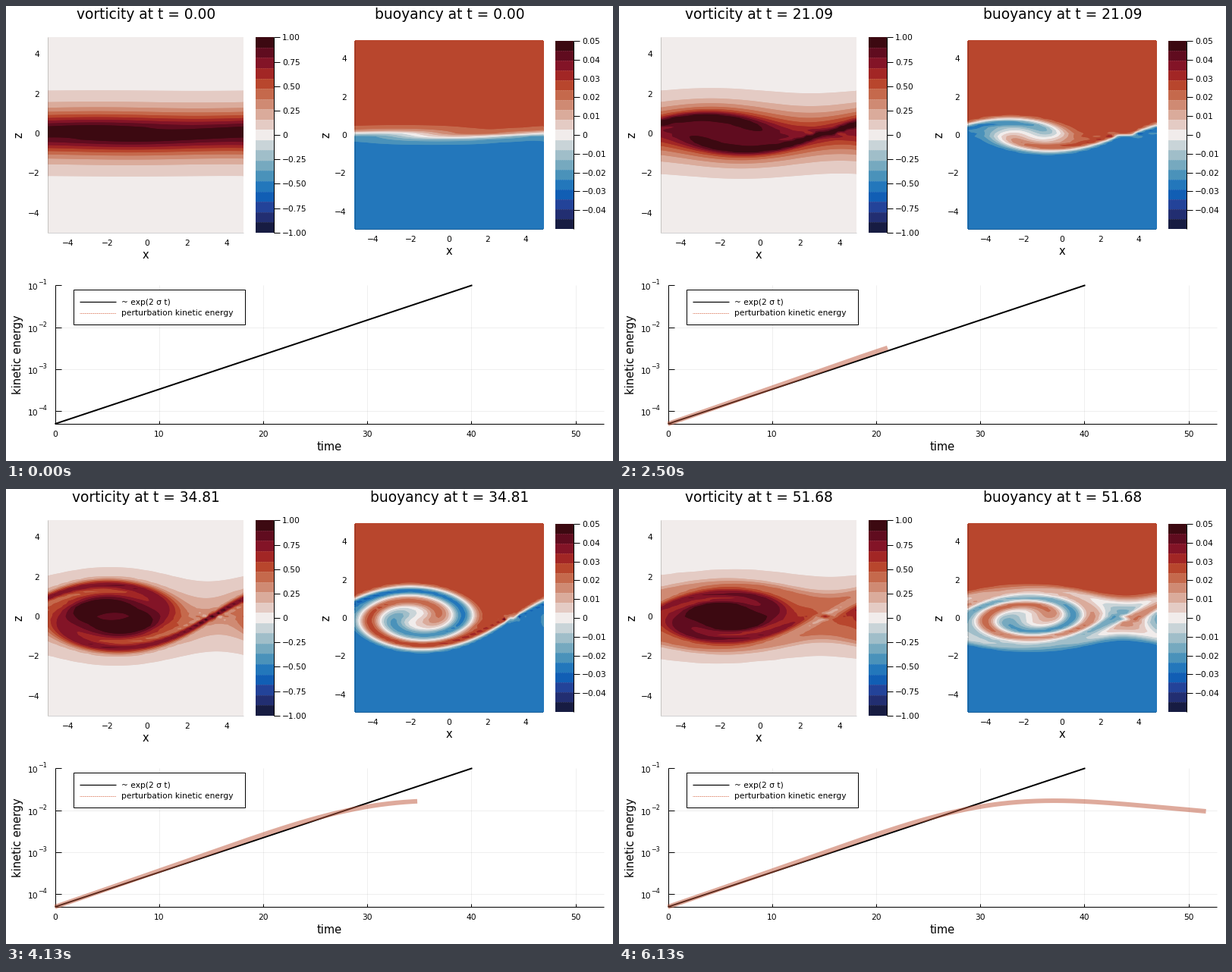
A matplotlib script that plays this animation: 800 px wide and 600 px high, repeating every 6260 ms.

```python
import numpy as np
import matplotlib.pyplot as plt
from matplotlib.animation import FuncAnimation
from matplotlib.colors import LinearSegmentedColormap
from matplotlib.patches import Rectangle

# Kelvin-Helmholtz billow: finite volumes on a staggered grid, axis 0 is z.
N, L = 64, 10.0
D = L / N
FRAMES, LOOP_MS, SUBSTEPS = 50, 6260, 11
TICKS = 2 * FRAMES + 1  # two ticks per picture, the last one is held
FRAME_TIME = 1.05472
GROWTH = 0.1 / FRAME_TIME
DT = FRAME_TIME / SUBSTEPS
RI, H, NU = 0.1, 0.25, 2e-4
START_ENERGY = 5e-5

faces = -L / 2 + D * np.arange(N + 1)
cells = faces[:-1] + D / 2
BILLOW_X = faces[21]
SHEAR = np.tanh(cells)[:, None] * np.ones(N)
STRAT = RI * H * np.tanh(cells / H)[:, None] * np.ones(N)

WRAP = np.arange(-3, N + 2) % N
CELL = np.clip(np.arange(-3, N + 3), 0, N - 1)
FACE = np.clip(np.arange(-2, N + 3), 0, N)

modes = np.arange(N)
DCT = np.sqrt(2 / N) * np.cos(np.pi * np.outer(modes, modes + 0.5) / N)
DCT[0] /= np.sqrt(2)
EIGEN = -4 / D**2 * (np.sin(np.pi * modes / (2 * N))[:, None] ** 2
                     + np.sin(np.pi * np.arange(N // 2 + 1) / N) ** 2)
EIGEN[0, 0] = np.inf


def stencil(q, idx):
    p, n = q[idx], len(idx) - 5
    return [p[j:j + n] for j in range(6)]


def centred(q, idx):
    _, a, b, c, d, _ = stencil(q, idx)
    return (7 * (b + c) - (a + d)) / 12


def flux(q, v, idx):
    """Fifth-order upwind flux of q carried by v."""
    a, b, c, d, e, f = stencil(q, idx)
    even = 37 * (c + d) - 8 * (b + e) + (a + f)
    odd = 10 * (d - c) - 5 * (e - b) + (f - a)
    return (v * even - np.abs(v) * odd) / 60


def centred_x(q):
    return centred(q.T, WRAP).T


def div_x(q, v):
    f = flux(q.T, v.T, WRAP).T
    return (np.roll(f, -1, 1) - f) / D


def div_z(q, v, idx):
    return np.diff(flux(q, v, idx), axis=0) / D


def laplacian(q):
    p = np.vstack((q[:1], q, q[-1:]))
    return (np.roll(q, 1, 1) + np.roll(q, -1, 1) + p[2:] + p[:-2] - 4 * q) / D**2


def tendency(u, w, b, gravity):
    gu = (NU * laplacian(u - SHEAR) - div_x(u, centred_x(u))
          - div_z(u, centred_x(w), CELL))
    gw = NU * laplacian(w) - div_x(w, centred(u, CELL))
    gw[1:-1] += gravity * (b[1:] + b[:-1]) / 2 - div_z(w, centred(w, FACE), FACE)
    gw[[0, -1]] = 0
    gb = NU * laplacian(b - STRAT) - div_x(b, u) - div_z(b, w, CELL)
    return gu, gw, gb


def project(u, w, b):
    div = (np.roll(u, -1, 1) - u + np.diff(w, axis=0)) / D
    p = np.fft.irfft(DCT.T @ (DCT @ np.fft.rfft(div, axis=1) / EIGEN), N, axis=1)
    u = u - (p - np.roll(p, 1, 1)) / D
    w[1:-1] -= np.diff(p, axis=0) / D
    return u, w, b


def step(state, gravity):
    previous = None
    for gamma, zeta in ((8 / 15, 0), (5 / 12, -17 / 60), (3 / 4, -5 / 12)):
        rate = tendency(*state, gravity)
        previous = previous or rate
        state = project(*(q + DT * (gamma * g + zeta * h)
                          for q, g, h in zip(state, rate, previous)))
        previous = rate
    return state


def energy(u, w, b):
    return 0.5 * (np.mean((u - SHEAR) ** 2) + np.mean(w**2))


def rescale(state, target):
    u, w, b = state
    s = np.sqrt(target / energy(*state))
    return SHEAR + s * (u - SHEAR), s * w, STRAT + s * (b - STRAT)


def unstable_mode():
    """Growing mode of the linearised flow, symmetric about BILLOW_X."""
    k, z = 2 * np.pi / L, faces[1:-1]
    m = N - 1
    eye, flow = np.eye(m), np.tanh(z)
    lap = (np.eye(m, k=1) + np.eye(m, k=-1) - 2 * eye) / D**2 - k**2 * eye
    inv = np.linalg.inv(lap)
    curvature = -2 * flow * (1 - flow**2)
    n2 = RI / np.cosh(z / H) ** 2
    matrix = 1j * k * np.block([
        [curvature[:, None] * inv - np.diag(flow), -eye],
        [n2[:, None] * inv, -np.diag(flow)]])
    values, vectors = np.linalg.eig(matrix)
    mode = vectors[:, np.argmax(values.real)]
    psi = inv @ mode[:m]
    scale = -psi[m // 2]
    psi, buoy = np.pad(psi / scale, 1), np.pad(mode[m:] / scale, 1)
    psi = (psi + psi[::-1].conj()) / 2
    buoy = (buoy - buoy[::-1].conj()) / 2
    psi = np.outer(psi, np.exp(1j * k * (faces - BILLOW_X))).real
    buoy = np.outer((buoy[1:] + buoy[:-1]) / 2,
                    np.exp(1j * k * (cells - BILLOW_X))).real
    return (SHEAR + np.diff(psi[:, :-1], axis=0) / D,
            -np.diff(psi, axis=1) / D, STRAT + buoy)


def grow(state, steps, gravity):
    """Let a tiny perturbation settle, then measure its growth rate."""
    state = rescale(state, 1e-8)
    for _ in range(steps):
        state = step(state, gravity)
    before = energy(*state)
    for _ in range(steps):
        state = step(state, gravity)
    return state, np.log(energy(*state) / before) / (2 * DT * steps)


def vorticity(u, w, b):
    shear = np.vstack((np.zeros((1, N)), np.diff(u, axis=0) / D))
    return shear - (w - np.roll(w, 1, 1))[:-1] / D


def simulate():
    # Find the gravity at which the mode grows at the plotted rate.
    state, rate = grow(unstable_mode(), 100, 1)
    state, light_rate = grow(state, 75, 0.95)
    gravity = 1 - 0.05 * (GROWTH - rate) / (light_rate - rate)
    gravity = np.clip(gravity, 0.9, 1.05)
    state, _ = grow(state, 50, gravity)

    state = rescale(state, START_ENERGY)
    snapshots, energies = [], [energy(*state)]
    for frame in range(FRAMES):
        snapshots.append((vorticity(*state), state[2]))
        if frame < FRAMES - 1:
            for _ in range(SUBSTEPS):
                state = step(state, gravity)
                energies.append(energy(*state))
    return snapshots, np.array(energies)


snapshots, energies = simulate()
times = DT * np.arange(len(energies))

# Drawing: one axes in pixel units, y downwards.
PT = 0.72
BANDS = 19
stops = [(23, 28, 66), (41, 58, 143), (11, 102, 189), (69, 144, 185),
         (142, 181, 194), (210, 216, 219), (230, 210, 204), (213, 157, 137),
         (196, 101, 72), (172, 43, 36), (120, 14, 40), (60, 9, 17)]
stops = [(i / 11, c) for i, c in enumerate(stops)]
stops += [(0.5, (241, 237, 236)), (14 / 18, (185, 72, 46))]
balance = LinearSegmentedColormap.from_list(
    "balance", [(p, np.array(c) / 255) for p, c in sorted(stops)])
palette = balance(np.linspace(0, 1, BANDS))

plt.rcParams["font.family"] = "DejaVu Sans"
fig = plt.figure(figsize=(8, 6), dpi=100, facecolor="white")
ax = fig.add_axes([0, 0, 1, 1])
ax.set_xlim(0, 800)
ax.set_ylim(600, 0)
ax.axis("off")


def text(x, y, s, size=10.67, ha="center", **kw):
    kw.setdefault("va", "baseline")
    return ax.text(x, y, s, fontsize=size * PT, ha=ha, **kw)


def line(xs, ys, width=1, color="black", **kw):
    kw.setdefault("solid_capstyle", "butt")
    return ax.plot(xs, ys, lw=width * PT, color=color, **kw)[0]


def number(value, fmt="{:g}"):
    return fmt.format(value).replace("-", "\u2212") if value else "0"


class Panel:
    def __init__(self, name, x0, y0, scale, nodes, limit, bar_x, ticks):
        self.name, self.limit = name, limit
        self.x, self.y = x0 + scale * nodes, y0 - scale * nodes
        self.levels = np.linspace(-limit, limit, BANDS + 1)
        self.fills = []
        left, right, bottom, top = self.x[0], self.x[-1], self.y[0], self.y[-1]
        middle = (left + right) / 2
        self.title = text(middle + 0.5, 17, "", 18.67)
        for v in range(-4, 5, 2):
            text(x0 + scale * v, bottom + 17, number(v))
            text(left - 11, y0 - scale * v + 4, number(v), ha="right")
        text(middle, bottom + 34, "x", 14.67)
        text(left - 38.5, (top + bottom) / 2, "z", 14.67, va="center", rotation=90)
        line([left, left, right], [top, bottom, bottom], 0.7, alpha=0.25, zorder=3)
        self.colorbar(bar_x, top, bottom, ticks)

    def colorbar(self, x, top, bottom, ticks):
        height = (bottom - top) / BANDS
        for i, color in enumerate(palette):
            ax.add_patch(Rectangle((x, bottom - (i + 1) * height), 24, height,
                                   fc=color, lw=0, antialiased=False))
            if i:
                y = bottom - i * height
                line([x, x + 24], [y, y], 0.6, "white", alpha=0.3, ls=":")
        line([x + 24, x + 24], [top, bottom])
        for v in ticks:
            y = (top + bottom) / 2 - v / self.limit * (bottom - top) / 2
            line([x + 24, x + 32], [y, y])
            text(x + 35, y + 4, number(v, "{:.2f}"), ha="left")

    def show(self, field, time):
        title = f"{self.name} at t = {time:.2f}"
        if self.title.get_text() == title:
            return
        self.title.set_text(title)
        for fill in self.fills:
            fill.remove()
        data = np.clip(field, -self.limit, self.limit)
        # The aliased layer below hides seams between smooth-edged bands.
        self.fills = [ax.contourf(self.x, self.y, data, levels=self.levels,
                                  colors=palette, antialiased=smooth, zorder=1)
                      for smooth in (False, True)]


panels = [
    Panel("vorticity", 186, 168, 26.15, faces[:-1], 1, 329,
          np.arange(-4, 5) / 4),
    Panel("buoyancy", 584, 170, 25.2, cells, 0.05, 724,
          np.arange(-4, 6) / 100),
]


def time_px(t):
    return 64.5 + 13.72 * np.asarray(t)


def energy_px(e):
    return 368.2 - 55.4 * (np.log10(e) + 1)


LEFT, RIGHT, TOP, BOTTOM = 64.5, 788, 368.2, 551.3
for t in range(0, 51, 10):
    x = time_px(t)
    line([x, x], [TOP, BOTTOM], 0.8, alpha=0.08)
    line([x, x], [BOTTOM, BOTTOM - 4])
    text(x, 568, str(t))
for p in range(-4, 0):
    y = energy_px(10.0**p)
    line([LEFT, RIGHT], [y, y], 0.8, alpha=0.08 if p < -1 else 0)
    line([LEFT, LEFT + 8], [y, y])
    text(42, y + 6, "10", ha="right")
    text(42, y - 1, number(p), 8, ha="left")
line([LEFT, LEFT, RIGHT], [TOP, BOTTOM, BOTTOM])
text(426.5, 586, "time", 14.67)
text(16, 460, "kinetic energy", 14.67, va="center", rotation=90)

end = np.log(0.1 / START_ENERGY) / (2 * GROWTH)
line(time_px([0, end]), energy_px([START_ENERGY, 0.1]), 2)
curve = line([], [], 6, (0.75, 0.34, 0.23), alpha=0.5, zorder=4)

ax.add_patch(Rectangle((88.5, 374), 226, 45.5, fc="white", ec="black",
                       lw=PT, zorder=5))
line([97, 145], [389.5, 389.5], 1.2, zorder=6)
line([97, 145], [404.5, 404.5], 1, (0.88, 0.55, 0.45), ls=(0, (1, 0.6)), zorder=6)
text(152, 393.5, "~ exp(2 \u03c3 t)", ha="left", zorder=6)
text(152, 408.5, "perturbation kinetic energy", ha="left", zorder=6)


def update(tick):
    frame = min(tick // 2, FRAMES - 1)
    for panel, field in zip(panels, snapshots[frame]):
        panel.show(field, frame * FRAME_TIME)
    shown = slice(frame * SUBSTEPS + 1)
    curve.set_data(time_px(times[shown]), energy_px(energies[shown]))


anim = FuncAnimation(fig, update, frames=TICKS, interval=LOOP_MS / TICKS,
                     init_func=lambda: update(0), repeat=True, repeat_delay=0,
                     blit=False)
plt.show()
```
